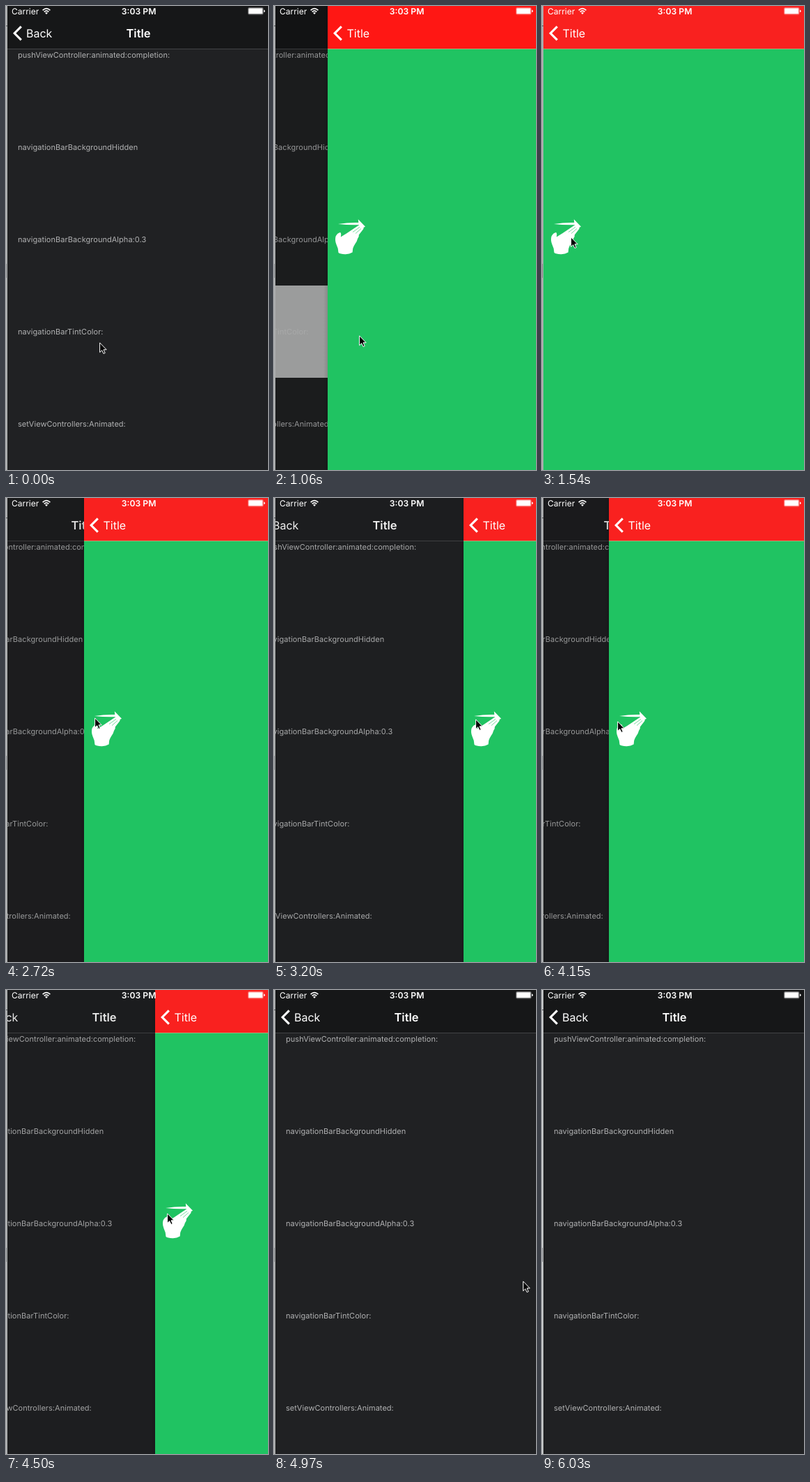
An HTML page for the animation above (6090 ms loop, 376x664 px).

```html
<!DOCTYPE html>
<html lang="en">
<head>
<meta charset="utf-8">
<title>Navigation swipe</title>
<style>
  html, body { margin: 0; width: 100%; height: 100%; overflow: hidden; background: #202123; }
  svg { display: block; width: 376px; height: 664px; font-family: Inter, Roboto, sans-serif; fill: #fff;
        text-rendering: geometricPrecision; }
  .cell { font-size: 11px; letter-spacing: .04px; fill: #b0b1b2; }
  .nav { font-size: 16px; }
  .title { font-size: 16.5px; font-weight: 600; }
  .status { font-size: 12px; }
  .line { fill: none; stroke: #fff; }
</style>
</head>
<body>
<svg viewBox="0 0 376 664">
  <defs>
    <clipPath id="screen"><rect x="2" width="374" height="664"/></clipPath>
    <linearGradient id="shade">
      <stop offset="0" stop-color="#000" stop-opacity="0"/>
      <stop offset="1" stop-color="#000" stop-opacity=".12"/>
    </linearGradient>
    <path id="chevron" class="line" stroke-width="3.1" d="M21.8 29.4 12.2 39 21.8 48.6"/>
  </defs>

  <g clip-path="url(#screen)">
    <rect width="376" height="664" fill="#202123"/>
    <g id="list">
      <rect id="picked" x="2" y="400" width="374" height="132" fill="#b9baba"/>
      <g id="cells"></g>
      <rect id="bar" x="2" width="374" height="61" fill="#161718"/>
      <rect x="2" y="61" width="374" height="1" fill="#434446"/>
      <use href="#chevron"/>
      <text class="nav" x="29" y="45">Back</text>
      <text class="title" x="190" y="45" text-anchor="middle">Title</text>
    </g>
    <rect id="dim" width="376" height="664" fill="#000"/>

    <g id="page">
      <rect x="-4" width="6" height="664" fill="url(#shade)"/>
      <rect x="2" y="61" width="374" height="603" fill="#20c362"/>
      <rect id="red" x="2" width="374" height="61"/>
      <rect x="2" y="61" width="374" height="1" fill="#a6a878"/>
      <use href="#chevron"/>
      <text class="nav" x="29.5" y="45">Title</text>
      <path d="M17 312 Q32 309.6 46.3 310 L45.8 305.3 56 315.8 50.5 318.4 46.5 313.2 Q32 313.6 17 312Z"/>
      <path d="M17.5 353 Q17.5 347 14.4 341 Q12 335 13.6 329.5 Q16 324.8 20 324 Q22 325 20.8 330.6
        L29 325.6 45.5 314.6 Q48.5 312.8 49.6 314.6 L53 316.6 Q54.6 318 52.2 320.6 L46.8 327.6
        Q47.4 330 45 333 L43.6 337 Q39.5 343 38.2 347 L37.6 352.6 Q33 355.4 27 355.2 Q20 355 17.5 353Z"/>
      <path fill="none" stroke="#20c362" stroke-width=".6" d="M38 323.6 48 316.4M42 325.6 50 318.6"/>
    </g>
  </g>

  <g class="status">
    <text x="8" y="11.7">Carrier</text>
    <text x="190.6" y="11.7" text-anchor="middle" font-size="12.2" font-weight="600">3:03 PM</text>
    <path class="line" stroke-width="1.7" d="M52.6 6.2Q58 1.2 63.4 6.2M54.7 8.4Q58 5.4 61.3 8.4"/>
    <path d="M58 11.9 56 9.8Q58 8.2 60 9.8Z"/>
    <rect class="line" x="347.5" y="2.5" width="21.5" height="9.5" rx="1.5" stroke-width=".7" stroke-opacity=".55"/>
    <rect x="348.2" y="3.2" width="20.1" height="8.1" rx=".8"/>
    <path d="M370 5.4Q371.6 5.6 371.6 7.2T370 9Z"/>
  </g>

  <g id="edge">
    <rect id="strip" width="2" height="664"/>
    <rect y="28" width="2" height="1" fill="#55585a"/>
    <rect y="369" width="1" height="20" fill="#84878a"/>
  </g>

  <path id="cursor" fill="#000" stroke="#fff" stroke-width="1"
    d="M.6 .9V14.6L3.7 11.7 6 16.5 8.2 15.5 6 10.8H10.2Z"/>
</svg>

<script>
const $ = id => document.getElementById(id);
const LOOP = 6090, STEP = 118.2, WIDTH = 374;
const PUSH = 8, DRAG = 19, LET_GO = 38;

// page offset at each step of the swipe
const drag = [2, 12, 38, 74, 110, 142, 172, 225, 270, 297, 290, 267,
              211, 150, 102, 80, 94, 125, 166, 212, 258, 308, 356, 374];

// pointer: step, x, y
const path = [[0, 134, 481], [5, 122, 471], [9, 122, 471], [10, 112, 455], [11, 88, 412],
              [12, 59, 362], [13, 41, 330], [14, 41, 330], [15, 25, 323], [17, 1, 314],
              [23, 128, 314], [31, 212, 318], [38, 231, 319], [39, 268, 326],
              [40, 310, 352], [41, 343, 392], [42, 357, 416]];

const names = ['pushViewController:animated:completion:', 'navigationBarBackgroundHidden',
               'navigationBarBackgroundAlpha:0.3', 'navigationBarTintColor:', 'setViewControllers:Animated:'];
const cells = names.map((name, i) => {
  const text = document.createElementNS('http://www.w3.org/2000/svg', 'text');
  text.textContent = name;
  text.setAttribute('class', 'cell');
  text.setAttribute('x', 17);
  text.setAttribute('y', 73.8 + 132 * i);
  $('cells').append(text);
  return text;
});

function pageX(k) {
  if (k < PUSH) return WIDTH;
  if (k < DRAG) {
    const s = 0.82 + (k - PUSH) * 2.17;
    return Math.round(WIDTH * (1 + s) * Math.exp(-s));
  }
  return drag[k - DRAG] ?? WIDTH;
}

function pointer(k) {
  let i = path.findIndex(p => p[0] > k);
  if (i < 0) i = path.length;
  const a = path[i - 1], b = path[i] || a;
  const f = b === a ? 0 : (k - a[0]) / (b[0] - a[0]);
  let x = a[1] + (b[1] - a[1]) * f;
  const y = a[2] + (b[2] - a[2]) * f;
  // the page trails the finger while it is dragged
  if (k >= DRAG && k < LET_GO) {
    const now = pageX(k);
    x = now + 2 + Math.min(9, 2 + 2 * (k - DRAG)) + 0.18 * (now - pageX(k - 1));
  }
  return [Math.round(x), Math.round(y)];
}

const move = (id, x, y = 0) => $(id).setAttribute('transform', `translate(${x} ${y})`);
const set = (id, name, value) => $(id).setAttribute(name, value);

function draw(k) {
  const x = pageX(k), hidden = 1 - x / WIDTH;
  const pushing = k >= PUSH && k < 12;
  move('page', x);
  set('page', 'visibility', x < WIDTH ? 'visible' : 'hidden');
  move('list', Math.round(-0.3 * WIDTH * hidden));
  set('dim', 'opacity', 0.2 * hidden);
  set('picked', 'visibility', pushing ? 'visible' : 'hidden');
  cells[3].style.fill = pushing ? '#c8c9c9' : '';
  set('bar', 'fill', k >= DRAG && hidden > 0 ? '#1e1f21' : '#161718');
  set('red', 'fill', pushing ? '#ff1714' : '#f9211f');
  set('strip', 'fill', k >= 51 ? '#c6c8c9' : '#adafb0');
  move('cursor', ...pointer(k));
  set('cursor', 'opacity', k < 44 ? 1 : k < 45 ? 0.5 : 0);
}

const start = performance.now();
function tick(now) {
  const t = Math.max(0, now - start) % LOOP;
  draw(Math.min(51, Math.floor((t + 6) / STEP)));
  requestAnimationFrame(tick);
}
draw(0);
requestAnimationFrame(tick);
</script>
</body>
</html>
```
